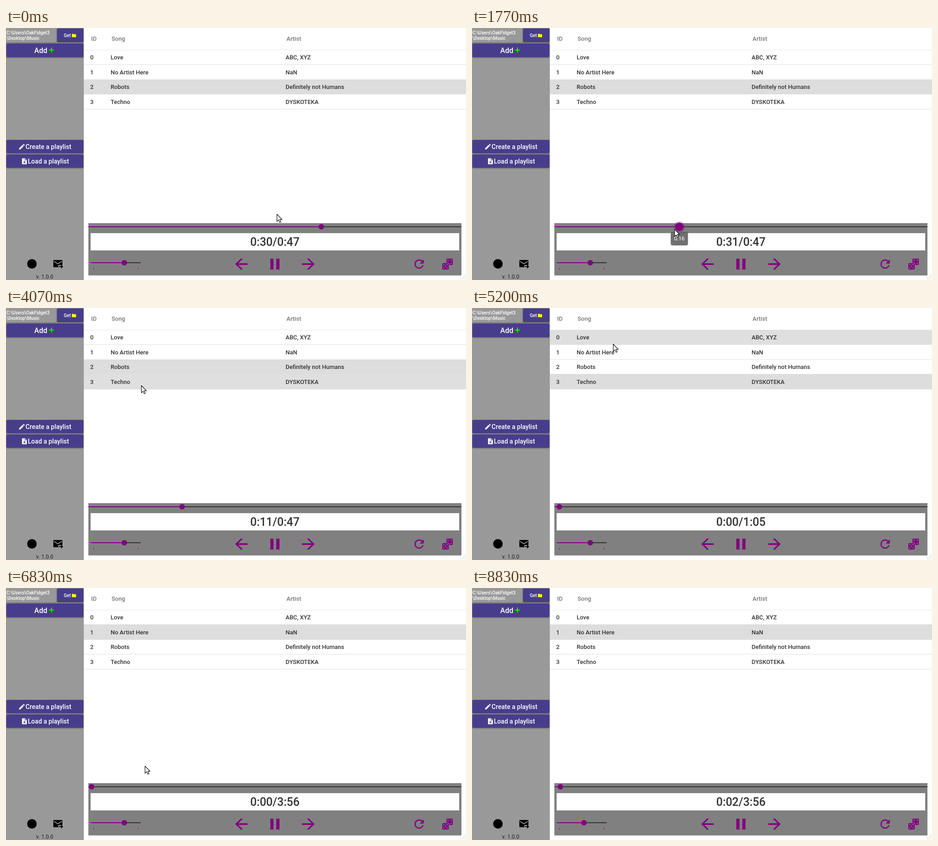
Write an HTML page with a canvas that moves like this. It is 1011x554 px and loops after 9.23 s.

```html
<!DOCTYPE html>
<html lang="en">
<head>
<meta charset="utf-8">
<title>Music player</title>
<style>
  html, body { margin: 0; width: 100%; height: 100%; overflow: hidden; background: #fff; }
  canvas { display: block; }
</style>
</head>
<body>
<canvas id="stage" width="1011" height="554"></canvas>
<script>
const ctx = document.getElementById('stage').getContext('2d');
const LOOP = 9230;
const PURPLE = '#800080', INDIGO = '#483d8b', DARK = '#333';
const ROW_TOP = [48, 80, 113, 145, 178];
const SONGS = [
  ['Love', 'ABC, XYZ'],
  ['No Artist Here', 'NaN'],
  ['Robots', 'Definitely not Humans'],
  ['Techno', 'DYSKOTEKA']
];
const PLAY_BUTTON = { x: 592, y: 518, r: 24 };

const ICON = {
  arrow: new Path2D('M20 11H7.83l5.59-5.59L12 4l-8 8 8 8 1.41-1.41L7.83 13H20z'),
  refresh: new Path2D('M17.65 6.35C16.2 4.9 14.21 4 12 4c-4.42 0-7.99 3.58-7.99 8s3.57 8 7.99 8c3.73 0 6.84-2.55 7.73-6h-2.08c-.82 2.33-3.04 4-5.65 4-3.31 0-6-2.69-6-6s2.69-6 6-6c1.66 0 3.14.69 4.22 1.78L13 11h7V4z'),
  pencil: new Path2D('M3 17.25V21h3.75L17.8 9.94l-3.75-3.75zM20.7 7.04a1 1 0 0 0 0-1.41l-2.34-2.34a1 1 0 0 0-1.41 0l-1.83 1.83 3.75 3.75z'),
  file: new Path2D('M4 2h10l6 6v14H4zM13 3.5V9h5.5zM11 11v3H8v2h3v3h2v-3h3v-2h-3v-3z'),
  folder: new Path2D('M10 4H4a2 2 0 0 0-2 2v12a2 2 0 0 0 2 2h16a2 2 0 0 0 2-2V8a2 2 0 0 0-2-2h-8z'),
  pointer: new Path2D('M.5.5V16.4L4.2 12.9 6.6 18.4 9.2 17.3 6.8 11.9H11.7z'),
  hand: new Path2D('M-1.5 12V1.5Q-1.5 0 0 0T1.5 1.5V7Q4.5 6 4.8 8 7.5 7 7.8 9 10.5 8.3 10.5 10.5V15Q10.5 18 8.5 20V22H.5V20L-5 13.5Q-6.2 11-4 10.8-2.8 10.8-1.5 12.5z')
};

const clamp = v => Math.min(1, Math.max(0, v));
const smooth = k => k * k * (3 - 2 * k);

// Keys are [time, ...values]; each leg eases in and out unless told otherwise.
function track(keys, t, ease = smooth) {
  let i = 0;
  while (i < keys.length - 2 && t >= keys[i + 1][0]) i++;
  const a = keys[i], b = keys[i + 1];
  const k = ease(clamp((t - a[0]) / (b[0] - a[0])));
  return a.slice(1).map((v, n) => v + (b[n + 1] - v) * k);
}

const seekKeys = [[970, 703], [1770, 456], [1880, 423], [2280, 373]];
const volumeKeys = [[7850, 260], [8350, 246]];
const pointerKeys = [
  [30, 595, 409], [700, 692, 442], [970, 692, 442], [2280, 362, 442], [2480, 362, 442],
  [2920, 589, 533], [3400, 589, 533], [4040, 297, 170], [4480, 297, 170],
  [5180, 310, 79], [5220, 310, 79], [5300, 306, 92], [6590, 306, 92],
  [6830, 305, 391], [7500, 262, 519], [7850, 262, 519], [8350, 248, 519],
  [8460, 248, 519], [8680, 198, 557]
];

function seekX(t) {
  if (t < 330) return 693;
  if (t < 970) return 703;
  if (t < 2830) return track(seekKeys, t, k => k)[0];
  if (t < 3830) return 377;
  if (t < 4430) return 387;
  if (t < 4830) return 187;
  if (t < 5290) return 192;
  if (t < 5830) return 198;
  if (t < 6330) return 187;
  return 188 + 1.55 * Math.floor((t - 6830) / 500);
}

function clock(t) {
  if (t < 830) return '0:30/0:47';
  if (t < 1830) return '0:31/0:47';
  if (t < 2480) return '0:32/0:47';
  if (t < 4430) return '0:11/0:47';
  if (t < 5830) return '0:00/1:05';
  const s = t < 7830 ? 0 : t < 8830 ? 1 : 2;
  return `0:0${s}/3:56`;
}

function pointerAt(t) {
  if (t >= 970 && t < 2480) return [seekX(t) - 11, 442];
  return track(pointerKeys, t);
}

function rect(x, y, w, h, color) {
  ctx.fillStyle = color;
  ctx.fillRect(x, y, w, h);
}

function disc(x, y, r, color) {
  ctx.fillStyle = color;
  ctx.beginPath();
  ctx.arc(x, y, r, 0, 2 * Math.PI);
  ctx.fill();
}

function round(x, y, w, h, r, color) {
  ctx.fillStyle = color;
  ctx.beginPath();
  ctx.roundRect(x, y, w, h, r);
  ctx.fill();
}

function poly(color, ...pts) {
  ctx.fillStyle = color;
  ctx.beginPath();
  for (let i = 0; i < pts.length; i += 2) ctx.lineTo(pts[i], pts[i + 1]);
  ctx.fill();
}

function text(str, x, y, size, color, weight = 500, align = 'left') {
  ctx.font = `${weight} ${size}px Roboto, sans-serif`;
  ctx.textAlign = align;
  ctx.fillStyle = color;
  ctx.fillText(str, x, y);
}

// 24-unit icon centred on x, y
function icon(path, x, y, sx, sy, color) {
  ctx.save();
  ctx.translate(x, y);
  ctx.scale(sx, sy);
  ctx.translate(-12, -12);
  ctx.fillStyle = color;
  ctx.fill(path, 'evenodd');
  ctx.restore();
}

function button(x, y, w, h) {
  ctx.save();
  ctx.shadowColor = 'rgba(0,0,0,.5)';
  ctx.shadowBlur = 3;
  ctx.shadowOffsetY = 1;
  round(x, y, w, h, 2, INDIGO);
  ctx.restore();
}

function mail() {
  round(104, 510, 20, 16, 2, '#000');
  ctx.strokeStyle = '#999';
  ctx.lineWidth = 1.8;
  ctx.beginPath();
  ctx.moveTo(105.5, 513);
  ctx.lineTo(114, 518.5);
  ctx.lineTo(122.5, 513);
  ctx.stroke();
  rect(115, 521, 10, 6, '#999');
  rect(116.5, 523.5, 5, 2, '#000');
  poly('#000', 121, 520, 125.5, 524.5, 121, 529);
}

function sidebar() {
  rect(0, 0, 171, 554, '#999');
  rect(0, 32, 111, 1, '#666');
  text('C:\\Users\\OakFidget3', 1, 14, 10, '#fff');
  text('\\Desktop\\Music', 1, 26, 10, '#fff');
  button(112, 1, 58, 30);
  text('Get', 127, 20, 10, '#fff');
  icon(ICON.folder, 149.5, 16.5, .46, .46, '#ff0');

  button(1, 34, 169, 30);
  text('Add', 62, 55, 16, '#fff');
  rect(94.5, 47.5, 11, 2, '#0f0');
  rect(99, 43, 2, 11, '#0f0');

  button(1, 246, 169, 29);
  icon(ICON.pencil, 35, 261, .68, .68, '#fff');
  text('Create a playlist', 43, 266, 14, '#fff');
  button(1, 278, 169, 29);
  icon(ICON.file, 40.5, 293, .66, .66, '#fff');
  text('Load a playlist', 48, 298, 14, '#fff');

  disc(57, 518.5, 10.5, '#000');
  mail();
  text('v. 1.0.0', 85, 551, 12, '#222', 400, 'center');
}

function table(t, px, py) {
  const selected = t < 4430 ? 2 : t < 5400 ? 3 : 1;
  const head = '#757575';
  text('ID', 187, 28, 13, head);
  text('Song', 232, 28, 13, head);
  text('Artist', 616.5, 28, 13, head);
  rect(171, 48, 840, 1, '#e8e8e8');
  SONGS.forEach(([song, artist], i) => {
    const top = ROW_TOP[i], end = ROW_TOP[i + 1];
    const hover = px > 171 && py > top && py <= end;
    if (i === selected || hover) rect(171, top, 840, end - top + 1, i === selected ? '#ddd' : '#dfdfdf');
    rect(171, end, 840, 1, '#e0e0e0');
    const base = [69, 102, 134, 167][i];
    text(i, 185, base, 13, DARK);
    text(song, 230, base, 13, DARK);
    text(artist, 614.5, base, 13, DARK);
  });
}

// level: 0 idle, 1 hovered, 2 dragged
function slider(x0, x1, y, x, level) {
  rect(x0, y - 1, x1 - x0, 2, DARK);
  rect(x0, y - 1, x - x0, 2, PURPLE);
  if (level === 2) disc(x, y, 11.5, 'rgba(128,0,128,.35)');
  disc(x, y, [6, 8, 9][level], PURPLE);
}

function tooltip(label, x, y, w) {
  round(x - w / 2, y, w, 30, 4, 'rgba(97,97,97,.9)');
  text(label, x, y + 19, 12, '#fff', 400, 'center');
}

function die(x, y, pips) {
  round(x, y, 14, 14, 2, PURPLE);
  for (const [dx, dy] of pips) disc(x + 7 + dx * 3.6, y + 7 + dy * 3.6, 1.4, '#808080');
}

function controls(t, px, py) {
  const { x, y, r } = PLAY_BUTTON;
  const over = Math.hypot(px - x, py - y) < r;
  if (over) disc(x, y, r, 'rgba(255,255,255,.2)');
  icon(ICON.arrow, 517.5, 519, 1.72, 1.66, PURPLE);
  icon(ICON.arrow, 664.5, 519, -1.72, 1.66, PURPLE);
  if (t >= 3000 && t < 3340) {
    poly(PURPLE, 584, 507.5, 603, 519, 584, 531);
  } else {
    rect(581, 507, 7, 24, PURPLE);
    rect(594, 507, 7, 24, PURPLE);
  }
  icon(ICON.refresh, 908, 519, 1.27, 1.27, PURPLE);
  die(968, 507, [[-1, -1], [1, -1], [1, 1]]);
  round(958, 516, 16, 16, 2, '#808080');
  die(959, 517, [[-1, -1], [1, -1], [0, 0], [-1, 1], [1, 1]]);
  return over;
}

function player(t, px, py) {
  rect(181, 429, 820, 115, '#808080');
  rect(186, 451, 810, 38, '#fff');
  text(clock(t), 591, 479, 25, DARK, 500, 'center');

  const seek = seekX(t);
  const seekLevel = t < 560 || t >= 2480 ? 0 : t < 940 ? 1 : 2;
  slider(181, 1001, 437, seek, seekLevel);

  const vol = track(volumeKeys, t)[0];
  const volLevel = t < 7480 || t >= 8500 ? 0 : t >= 7800 && t < 8420 ? 2 : 1;
  slider(186, 296, 516, vol, volLevel);
  for (const x of [192, 290]) rect(x, 527, 1, 4, PURPLE);

  const over = controls(t, px, py);
  if (seekLevel) tooltip('0:' + String(Math.round((seek - 187) / 808 * 47)).padStart(2, '0'), seek, 448, 38);
  if (volLevel) tooltip(Math.round((vol - 192) / .98), vol, 527, 27);
  return over;
}

function grip() {
  for (let i = 0; i < 4; i++)
    for (let j = 3 - i; j < 4; j++) rect(999 + i * 3, 542 + j * 3, 1, 1, '#999');
}

function pointer(x, y, hand) {
  const path = hand ? ICON.hand : ICON.pointer;
  ctx.save();
  ctx.translate(x, y);
  ctx.fillStyle = '#fff';
  ctx.strokeStyle = '#000';
  ctx.lineWidth = 1.1;
  ctx.lineJoin = 'round';
  ctx.fill(path);
  ctx.stroke(path);
  if (hand) {
    ctx.beginPath();
    for (const dx of [1.5, 4.8, 7.8]) {
      ctx.moveTo(dx, 8);
      ctx.lineTo(dx, 12);
    }
    ctx.stroke();
  }
  ctx.restore();
}

function draw(now) {
  const t = now % LOOP;
  const [px, py] = pointerAt(t);
  rect(0, 0, 1011, 554, '#fff');
  sidebar();
  table(t, px, py);
  const hand = player(t, px, py);
  grip();
  if (t < 8680) pointer(px, py, hand);
  requestAnimationFrame(draw);
}
requestAnimationFrame(draw);
</script>
</body>
</html>
```
